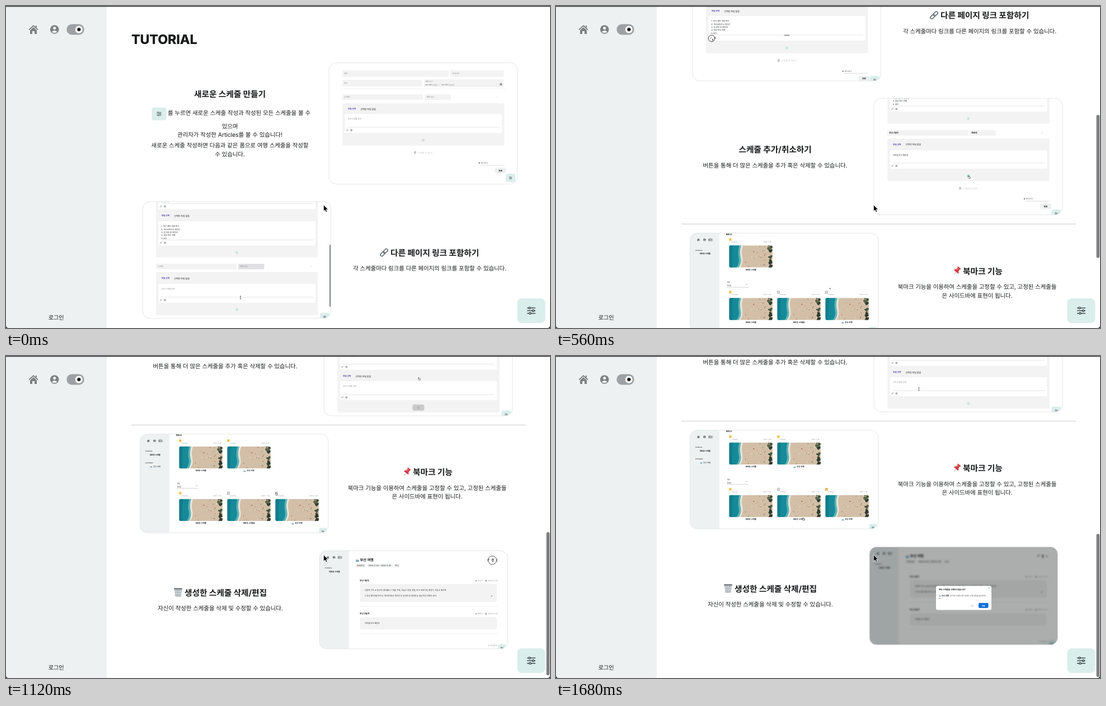
Write an HTML page that moves like this. It is 972 by 576 pixels and loops after 1.75 s.

```html
<!DOCTYPE html>
<html lang="ko">
<head>
<meta charset="utf-8">
<title>Tutorial</title>
<style>
html, body { margin: 0; width: 100%; height: 100%; overflow: hidden; background: #fff; }
svg { display: block; width: 972px; height: 576px; }
text {
  font-family: Inter, "Noto Sans CJK KR", "Noto Sans CJK JP", "Noto Sans CJK", sans-serif;
  letter-spacing: -.01em; text-rendering: geometricPrecision; white-space: pre;
}
</style>
</head>
<body>
<svg id="stage" viewBox="0 0 972 576" xmlns="http://www.w3.org/2000/svg"></svg>
<script>
const STEP = 70, COUNT = 25;
const SCROLL = [0, 0, 2, 7, 19.5, 90, 200, 325, 424.5, 470, 505, 532, 555, 589.5, 640, 674, 691, 697];
const SCROLL_END = 698;
const INK = '#191b1c', GRAY = '#8b8f90', PALE = '#c3c8c8', SIDE = '#edf1f1', MINT = '#daeeec', PANEL = '#f3f3f3';

// basic shapes; text is placed by its visual middle
const rect = (x, y, w, h, fill, r = 0, more = '') =>
  `<rect x="${x}" y="${y}" width="${w}" height="${h}" rx="${r}" fill="${fill}" ${more}/>`;
const line = (x1, x2, y, c = '#dcdcdc', w = .7) =>
  `<path d="M${x1} ${y}H${x2}" stroke="${c}" stroke-width="${w}"/>`;
const dot = (x, y, r, fill, more = '') => `<circle cx="${x}" cy="${y}" r="${r}" fill="${fill}" ${more}/>`;
const path = (d, fill, more = '') => `<path d="${d}" fill="${fill}" ${more}/>`;
const at = (x, y, s, body) => `<g transform="translate(${x} ${y}) scale(${s})">${body}</g>`;
const text = (x, y, s, size, { c = INK, b = 400, a = 'start' } = {}) =>
  `<text x="${x}" y="${y + size * .38}" font-size="${size}" fill="${c}" font-weight="${b}" text-anchor="${a}">${s.replace(/</g, '&lt;')}</text>`;
const during = (from, to, body) => `<g class="timed" data-from="${from}" data-to="${to}">${body}</g>`;

// icons
const home = (x, y, s, c = '#7d8183') =>
  at(x, y, s, path('M0-8L8.5-.2 7.3 1.2 0-5.5-7.3 1.2-8.5-.2ZM3.8-7H6V-3L3.8-5ZM-6 1.4L0-4.1 6 1.4V8H2V3H-2V8H-6Z', c));
const user = (x, y, s, c = '#7d8183') => at(x, y, s, dot(0, 0, 7.8, c) + dot(0, -2.5, 2.6, SIDE) + path('M-5 4.6Q0-1 5 4.6Q0 8-5 4.6Z', SIDE));
const sun = Array.from({ length: 8 }, (_, i) => `<path d="M0-3.5V-2" stroke="#111" stroke-width="1.3" transform="rotate(${i * 45})"/>`).join('');
const toggle = (x, y, s) => at(x, y, s, rect(-15.7, -9.4, 31.4, 18.8, '#9da1a6', 9.4) + at(6.3, 0, 1, dot(0, 0, 6.6, '#fff') + dot(0, 0, 2.5, '#111') + sun));
const sliders = (x, y, s) => at(x, y, s,
  [[-4.8, -3], [0, 3.5], [4.8, -2]].map(([dy, k]) =>
    line(-7.5, 7.5, dy, '#2b3335', 1.3) + dot(k, dy, 1.7, MINT, 'stroke="#2b3335" stroke-width="1.2"')).join(''));
const fab = (x, y, w = 17, h = 15) => rect(x, y, w, h, MINT, 3.5) + sliders(x + w / 2, y + 7.5, .33);
const ship = (x, y, s) => at(x, y, s, path('M-5 1H5L3 4H-4Z', '#5b83a6') + path('M-3.5-3H1L2.5 1H-3.5Z', '#b9c9d4') + line(-5, 5, 4.3, '#3aa3d8', 1.2));
const cross = (x, y, c = '#d2d2d2') => path(`M${x - 1.2} ${y - 1.2}l2.4 2.4m0-2.4l-2.4 2.4`, 'none', `stroke="${c}" stroke-width=".5"`);
const ibeam = (x, y) => path(`M${x - 1.2} ${y - 2.5}h2.4m-1.2 0v5m-1.2 0h2.4`, 'none', 'stroke="#222" stroke-width=".6"');
const hand = (x, y) => at(x, y, 1, path('M-1.5-2V0L-2 .5-.3 2.5H1.6L2 0-.6-.7V-2Z', '#fff', 'stroke="#222" stroke-width=".6"'));
const arrow = (x, y, s) => at(x, y, s, path('M0 0V11.5L2.7 9 4.5 13 6.5 12.1 4.7 8.2H8.2Z', '#000', 'stroke="#fff" stroke-width=".8"'));
const chain = (x, y, s, c, w) => at(x, y, s,
  `<g transform="rotate(-45)" fill="none" stroke="${c}" stroke-width="${w}"><rect x="-8.5" y="-2.7" width="9.5" height="5.4" rx="2.7"/><rect x="-1" y="-2.7" width="9.5" height="5.4" rx="2.7"/></g>`);
const pin = (x, y) => at(x, y, 1, `<g transform="rotate(38)">` +
  line(-.1, .1, 5, '#999', 8) + path('M-.5 2H.5L0 10Z', '#9aa2a8') + path('M-4-7H4L2.6-5V-1Q5 .3 5 2.6H-5Q-5 .3-2.6-1V-5Z', '#cf3b40') + path('M-1.6-5H0V-1H-1.6Z', '#e8797b') + '</g>');
const bin = (x, y) => at(x, y, 1, path('M-6.5-6H6.5L4.8 7.5H-4.8Z', '#a9b0b4') +
  path('M-4-5L-3 7M0-5V7M4-5L3 7M-6-2H6M-5.5 2H5.5', 'none', 'stroke="#e3e7e9" stroke-width=".8"') + rect(-7.5, -8, 15, 2.6, '#7d868b', 1.2));

// parts of the schedule form, local to a card
const HINT = ['상세 스케줄 입력'];
const FOOD = ['1. 부산 돼지 국밥 먹기', '2. 게스트하우스 체크인', '3. 짐 정리 후 광안대', '4. 점심 먹고 카페', '5. 바다'];
const PREP = ['수원역 기차 ⇒ 부산역 도착', '', '<준비물>', '1. 칫솔, 치약, 치실', '2. 정장, 양말, 옷', '3. 보조가방, 충전기, 지갑', '4. 핸드백'];

const field = (x, y, w, h, s, fill = PANEL, c = GRAY, b = 400) => rect(x, y, w, h, fill, 1.5) + text(x + 3, y + h / 2, s, 3.7, { c, b });
const row = (y, a = '소제목', b = '여행 장소', fill = PANEL, c = GRAY, w = 400) =>
  field(24, y, 144.5, 10, a, PANEL, c, w) + field(171, y, 46.5, 10, b, fill, c, w) + cross(300.5, y + 5);
const panel = (y, h) => rect(24, y, 289.5, h, PANEL, 2.5);
const file = y => text(34, y, '파일 선택', 3.6, { c: '#4a3aa8', b: 700 }) + text(56.3, y, '선택된 파일 없음', 4, { b: 500 });
const entry = (y, h, lines) => rect(28.5, y, 280.5, h, '#fff', 2) +
  lines.map((s, i) => text(33.5, y + 9 + i * 5.3, s, 3.5, { c: lines === HINT ? GRAY : INK })).join('') +
  line(33, 305, y + h - 10) + chain(32.7, y + h - 5, .25, '#888', 1.8) +
  dot(40, y + h - 5, 1.6, '#b5b9ba', 'stroke="#8c9192" stroke-width=".6"');
const add = (y, c = '#a9d6cd') => dot(168.5, y, 2, 'none', `stroke="${c}" stroke-width=".7"`) +
  path(`M167.3 ${y}h2.4m-1.2-1.2v2.4`, 'none', `stroke="${c}" stroke-width=".6"`);
const foot = y => rect(152, y - 2.3, 3.6, 4.6, '#bcc1c1', .6) + line(153, 155, y, '#fff', .6) +
  text(159, y, '스케줄 추가하기', 3.95, { c: PALE }) +
  text(267.5, y + 19, '#', 3.6, { b: 600 }) + text(271.5, y + 18.8, '해시태그', 3.6, { c: '#666' }) + line(271, 313.5, y + 23, '#ccc') +
  rect(296.5, y + 27.3, 20, 10, '#eef0f0', 3) + text(306.5, y + 32.2, '완료', 3.7, { b: 700, a: 'middle' });

let cards = 0;
function card(x, y, h, body) {
  const id = 'card' + cards++, w = 336.5;
  return `<g transform="translate(${x} ${y})"><clipPath id="${id}">${rect(0, 0, w, h, '#000', 13)}</clipPath>` +
    `<g clip-path="url(#${id})">${body}</g>${rect(0, 0, w, h, 'none', 13, 'stroke="#e4e7e7" stroke-width="1"')}</g>`;
}

const writeCard = card(577, 101.5, 217,
  field(24, 13.5, 190, 12, '제목') + field(217, 13.5, 95.5, 12, '카테고리') + field(24, 30.5, 142.5, 12, '장소') +
  rect(170, 29.5, 142.5, 14, PANEL, 1.5) + text(172, 33, '여행 기간 *', 3, { c: '#666' }) +
  `<text x="172" y="40" font-size="3.75" fill="#777" style="font-family:'Noto Sans Mono',monospace;letter-spacing:0">mm/dd/yyyy - mm/dd/yyyy</text>` +
  rect(305.5, 36.7, 3.6, 3.6, '#777', .5) + line(305.5, 309, 37.9, '#ddd', .5) +
  line(20, 316, 46.5, '#eee') + row(56.5) + panel(72.5, 75.5) + file(82.5) + entry(91.5, 34, HINT) +
  add(138.5, PALE) + foot(160.5) + fab(316, 198.5));

const linkCard = card(244, 350, 208.5,
  during(0, 1, panel(-5, 104.5) + entry(-41.5, 55, PREP) + file(25) + entry(35, 43.5, FOOD) + add(91) +
    row(111, '소제목', '여행 장소', '#e1e1e5') + panel(126, 77) + file(137) + entry(147, 34, HINT) + add(193) +
    ibeam(175, 171.5) + rect(334, 77, 1.8, 111, '#77797a', .9) + fab(317, 199)) +
  during(2, 24, panel(-5, 164) + file(7.5) + entry(16.5, 55, PREP) + file(83.5) + entry(92.5, 44, FOOD) + add(149.5) +
    foot(172) + fab(317, 199.5)) +
  during(2, 24, arrow(35, 133, .3)) +
  during(6, 24, dot(34, 132.5, 5.8, 'none', 'stroke="#222" stroke-width=".8"') + line(164, 173, 126.8, '#333', .9)));

const addCard = card(568.3, 589.5, 208.5,
  during(0, 14, panel(-5, 50.5) + entry(-20, 44, FOOD) + add(36.5) + row(57, '부산 2일차', '해운대', PANEL, INK, 600) +
    panel(72, 76) + file(82.5) + entry(93, 33, ['지하철 타고 해운대']) + add(139, '#3fae98') + foot(161) + hand(170, 141)) +
  during(15, 24, panel(-5, 207.5) + entry(92, 34, HINT) + file(137.5) + entry(146.5, 34, HINT)) +
  during(15, 16, rect(158, 188.3, 21, 11, '#cacaca', 3) + add(193.8, '#aab') + hand(170, 142)) +
  during(17, 20, rect(158, 188.3, 21, 11, '#e3eae8', 3) + add(193.8) + hand(157, 145.5)) +
  during(21, 24, add(193.5) + ibeam(80, 167.5)) + fab(317, 199));

// beach picture
let seed = 7;
const rnd = () => (seed = seed * 16807 % 2147483647) / 2147483647;
const many = (n, fn) => Array.from({ length: n }, fn).join('');
const beach = `<symbol id="beach" viewBox="0 0 77.5 39.5"><clipPath id="photo">${rect(0, 0, 77.5, 39.5, '#000', 3)}</clipPath><g clip-path="url(#photo)">` +
  rect(0, 0, 77.5, 39.5, '#d3bfa7') + path('M0 0H25Q21 10 23.5 20T20 39.5H0Z', '#e9e6dc') + path('M0 0H21.5Q18 11 20.5 21T17 39.5H0Z', '#5fb3b4') +
  path('M0 0H18Q15 12 17 22T13 39.5H0Z', '#168a99') + path('M0 0H7Q5 18 6 39.5H0Z', '#137c8d') +
  many(34, () => dot(27 + rnd() * 40, rnd() * 39, .35 + rnd() * .55, ['#f4efe6', '#7b6656', '#b0553f', '#4d7684'][rnd() * 4 | 0])) +
  many(26, () => dot(71 + rnd() * 7 - rnd() * 3, rnd() < .4 ? rnd() * 12 : 19 + rnd() * 21, .9 + rnd() * 1.7, ['#3b4a35', '#566249', '#2f3a30'][rnd() * 3 | 0])) +
  '</g></symbol>';

const mark = (x, y, on) => path(`M${x - 1.6} ${y - 2.2}h3.2v4.4l-1.6-1.2-1.6 1.2Z`, on ? '#f2bd35' : '#fff', `stroke="${on ? '#f2bd35' : '#555'}" stroke-width=".6"`);
const tile = (x, y, title, on) => mark(x + 2, y - 10, on) + text(x + 4, y - 5.8, 'schedule', 2.7, { c: GRAY }) +
  text(x + 75, y - 5.8, '2024. 5. 26', 2.7, { c: GRAY, a: 'end' }) +
  `<use href="#beach" x="${x}" y="${y}" width="77.5" height="39.5"/>` +
  (title[0] === '부' ? ship(x + 31, y + 43.6, .4) : '') +
  text(x + (title[0] === '부' ? 41.5 : 38.7), y + 43.5, title, 3.45, { b: 700, a: 'middle' });
const side = (h, extra = '') => rect(0, 0, 52.5, h, SIDE) + home(15, 12, .28, '#555') + user(26, 12, .28, '#555') + toggle(36.7, 12, .27) +
  text(9.5, 30.5, 'SCHEDULE', 2.4, { b: 500 }) + text(17, 37, '새로운 스케줄', 3.45, { b: 600 }) + extra;

const NEW = '새로운 스케줄', TRIP = '부산 여행';
const markCard = card(239.4, 830.7, 176.5,
  side(177) + text(64, 2, '북마크', 3.9, { b: 700 }) + tile(70, 22, NEW, true) +
  text(66, 88, '정렬', 2.8) + text(66, 93.8, '생성순', 3) + path('M100 91.5h2.4l-1.2 1.3Z', '#777') + line(66, 105, 97, '#bbb', .6) +
  tile(70, 116, NEW, true) + tile(156, 116, NEW + '2', false) + tile(242, 116, TRIP, false) +
  during(0, 10, arrow(249.5, 97.5, .25)) +
  during(11, 14, mark(244, 106, true) + hand(243, 107)) +
  during(15, 24, tile(156, 22, TRIP, true) + text(9.5, 51, 'BOOKMARK', 2.4, { b: 500 }) + ship(20, 58, .35) + text(23.5, 58, TRIP, 3.35, { b: 500 })) +
  during(15, 16, hand(243.5, 107)) + during(17, 24, mark(244, 106, true)) +
  during(17, 20, hand(211, 145)) + during(21, 24, hand(203, 159)) + fab(320, 167.5, 14));

const day = (y, h, name, place, date, lines) => text(72, y, name, 3.9, { b: 700 }) +
  dot(280, y + .4, 1, '#777') + text(282.5, y + .4, place, 3.3, { c: GRAY }) + rect(296.3, y - 1, 2.6, 2.8, '#999', .4) + text(318.5, y + .4, date, 3.4, { c: GRAY, a: 'end' }) +
  rect(72.5, y + 6.2, 244.5, h, PANEL, 3.5) + lines.map((s, i) => text(81, y + 17 + i * 10, s, 3.4, { b: 500 })).join('') + line(72, 320, y + h + 14, '#ebebeb');
const detail = side(177) + ship(68, 16.7, .62) + text(72.5, 16.6, TRIP, 6.3, { b: 700 }) +
  [[65, 17, '국내/부산'], [85.5, 45, '2024-5-26 ~ 2024-5-30'], [134, 9, '부산']].map(([x, w, s]) => rect(x, 23.6, w, 6.4, '#f2f3f3', 1.5) + text(x + w / 2, 26.8, s, 3.5, { a: 'middle' })).join('') +
  path('M301 18.6v-3.5h2m1.5-.5l-2.4 2.6', 'none', 'stroke="#333" stroke-width=".7"') +
  path('M308 15.2h3.4m-2.9 0l.3 4.2h1.8l.3-4.2m-1.8-.8h1.2', 'none', 'stroke="#222" stroke-width=".8"') +
  path('M318.5 15L315.5 17 318.5 19', 'none', 'stroke="#333" stroke-width=".7"') +
  day(53.3, 32, '부산 1일차', '부산역', '2024-5-26', [PREP[0].replace(' 도착', ' ') + PREP.slice(2).join(' '), FOOD.join(' ').replace('돼지 ', '돼지')]) +
  path('M306.5 82l1-.4 1.4-2', 'none', 'stroke="#333" stroke-width=".7"') +
  day(112.5, 22, '부산 2일차', '해운대', '2024-5-30', ['지하철 타고 해운대']) +
  text(318, 169, '# 국내/부산', 3.4, { c: GRAY, a: 'end' }) + fab(319, 167, 14);
const dialog = rect(119, 70, 99, 43, '#fff', 3) + text(124, 76.2, '해당 스케줄을 삭제하시겠습니까?', 3.5, { b: 700 }) + cross(213.5, 74, '#555') +
  ship(126, 87, .36) + text(129, 87, TRIP, 3.4, { b: 700 }) + text(144, 87, '문구에 삭제하시면 아래의 삭제 버튼을 눌러주세', 3.25, { c: '#444' }) +
  text(124, 92.5, '요', 3.25, { c: '#444' }) + text(184, 105, '취소', 3.2, { c: GRAY, a: 'middle' }) +
  rect(195, 100.5, 17.5, 9, '#0c6fd9', 2) + text(203.7, 105, '제출', 3.2, { c: '#fff', b: 700, a: 'middle' });
const deleteCard = card(560, 1039.3, 175.5,
  `<g id="detail">${detail}</g>` +
  during(16, 17, dot(309, 17, 7.6, 'none', 'stroke="#333" stroke-width=".8"')) +
  `<rect id="shade" width="337" height="176" fill="#000c08"/><g id="dialog">${dialog}</g>`);

// page copy
const title = (x, y, s, a = 'start') => text(x, y, s, 14.8, { b: 700, a });
const copy = (x, y, s, a = 'middle') => text(x, y, s, 10.5, { a });
const page = text(224, 59.2, 'TUTORIAL', 23.4, { b: 800 }) +
  title(400, 157.5, '새로운 스케줄 만들기', 'middle') +
  rect(260.5, 181.5, 26, 23, MINT, 4) + sliders(273.5, 193, .55) +
  copy(289, 191.5, '를 누르면 새로운 스케줄 작성과 작성된 모든 스케줄을 볼 수', 'start') +
  copy(400, 214.7, '있으며') + copy(400, 230.5, '관리자가 작성한 Articles를 볼 수 있습니다!') +
  copy(400, 249.3, '새로운 스케줄 작성하면 다음과 같은 폼으로 여행 스케줄을 작성할') + copy(400, 265, '수 있습니다.') + writeCard +
  linkCard + chain(675.5, 441, .95, '#6f797f', 1.8) + title(687, 441, '다른 페이지 링크 포함하기') +
  copy(757, 469.3, '각 스케줄마다 링크를 다른 페이지의 링크를 포함할 수 있습니다.') +
  title(391.5, 681, '스케줄 추가/취소하기', 'middle') + copy(391.5, 709.2, '버튼을 통해 더 많은 스케줄을 추가 혹은 삭제할 수 있습니다.') + addCard +
  line(224, 929, 814.5, '#e3e4e4', 2) + markCard + pin(716.5, 898) + title(727, 898.5, '북마크 기능') +
  copy(752.5, 926.7, '북마크 기능을 이용하여 스케줄을 고정할 수 있고, 고정된 스케줄들') + copy(752.5, 942.5, '은 사이드바에 표현이 됩니다.') +
  bin(307.5, 1114) + title(319, 1114, '생성한 스케줄 삭제/편집') + copy(383, 1142.5, '자신이 작성한 스케줄을 삭제 및 수정할 수 있습니다.') + deleteCard;

const stage = document.getElementById('stage');
stage.innerHTML = beach + rect(0, 0, 972, 576, '#fff') + `<g id="page">${page}</g>` +
  rect(0, 0, 180, 576, SIDE) + home(49, 42, 1) + user(86.7, 42, 1) + toggle(124, 42, 1) + text(89.7, 557, '로그인', 10.2, { a: 'middle', b: 500 }) +
  rect(913.5, 523, 50, 44, MINT, 8) + sliders(938.5, 545, 1) +
  rect(965.6, 0, 5.6, 256, '#7b7d7e', 2.8, 'id="thumb"') + arrow(567.4, 355.8, 1) +
  rect(0, 0, 972, 1.4, '#3c3e3f') + path('M0 571Q0 576 5 576H0ZM972 571Q972 576 967 576H972Z', '#222');

const el = Object.fromEntries(['page', 'thumb', 'detail', 'shade', 'dialog'].map(id => [id, document.getElementById(id)]));
const timed = [...document.querySelectorAll('.timed')].map(g => [g, +g.dataset.from, +g.dataset.to]);

function draw(n) {
  const y = SCROLL[n] ?? SCROLL_END;
  el.page.setAttribute('transform', `translate(0 ${-y})`);
  el.thumb.setAttribute('y', 3 + y * .4515);
  el.thumb.style.display = y ? '' : 'none';
  for (const [g, from, to] of timed) g.style.display = n >= from && n <= to ? '' : 'none';
  const open = n >= 20;
  el.shade.setAttribute('opacity', open ? .33 : n === 19 ? .115 : n === 18 ? .04 : 0);
  el.dialog.setAttribute('opacity', open ? 1 : n === 19 ? .32 : n === 18 ? .1 : 0);
  el.dialog.setAttribute('transform', open ? '' : 'translate(-6.5 -4.6) scale(1.04)');
  el.detail.style.filter = open ? 'blur(1.8px)' : '';
}

const start = performance.now();
let last = -1;
function tick() {
  const n = Math.floor((performance.now() - start) / STEP) % COUNT;
  if (n !== last) draw(last = n);
  requestAnimationFrame(tick);
}
tick();
</script>
</body>
</html>
```
